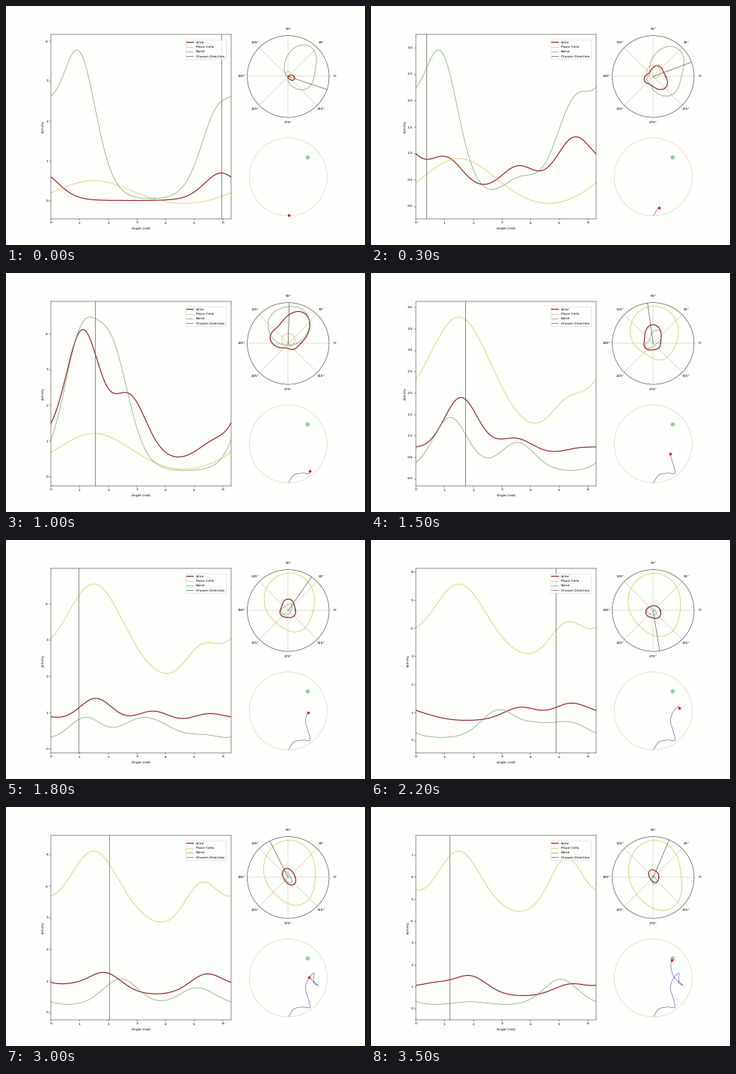
Write a matplotlib script that moves like this. It is 480 by 320 pixels and loops after 3.6 s.

```python
import numpy as np
import matplotlib.pyplot as plt
from matplotlib.animation import FuncAnimation
from matplotlib.patches import Circle

FRAMES, INTERVAL = 36, 100
TAU = 2 * np.pi
R = 52.1  # arena radius, one unit per pixel
ACTOR, PLACE, NOISE, CHOSEN = "#8b1a1a", "#d8b83c", "#5f9c62", "#4a4a40"

theta = np.linspace(0, TAU, 241)


def bump(centre, sharp=2.8):
    return np.exp(sharp * (np.cos(theta - centre) - 1))


def lobes(base, *peaks):
    """Base level plus equally wide peaks, each (height, centre)."""
    return base + sum(h * bump(c) for h, c in peaks)


def place(low, high, second):
    """Broad lobe ahead; it sharpens as the second lobe grows."""
    shape = bump(1.5, .3 + 1.5 * second) + second * bump(5.25)
    return low + (high - low) * (shape - shape.min()) / np.ptp(shape)


# step: heading, actor, place cells, noise
KEYS = {
    0: (5.96, lobes(.01, (.69, 5.95)), place(-.06, .51, 0),
        lobes(.02, (3.55, .97), (2.06, -.45))),
    6: (5.83, lobes(.5, (1.27, 1.05), (.98, 3.57), (1.55, 5.42)), place(.18, 1.3, 0),
        lobes(.2, (1.98, .65), (.78, 3.65), (1.93, 5.3))),
    10: (1.54, lobes(.4, (3.62, 1.1), (1.75, 2.75), (.5, 5.7)), place(.22, 1.22, 0),
         lobes(.15, (3.45, 1.05), (3, 2.15))),
    15: (1.71, lobes(.54, (1.35, 1.57), (.38, 3.5), (.17, 5.8)), place(1.3, 3.78, .17),
         lobes(.16, (1.27, 1.2), (.68, 3.55))),
    22: (4.87, lobes(.7, (.47, 3.65), (.58, 5.4), (.18, .2)), place(3.1, 5.58, .4),
         lobes(.08, (.97, 2.87), (.38, 4.2), (.52, 5.4))),
    26: (6.24, lobes(.56, (.52, 1.85), (.74, 5.47)), place(1.5, 3.45, .15),
         lobes(.25, (1.48, 2.47), (.16, 5.7))),
    35: (1.17, lobes(.55, (.9, 1.9), (.55, 5.4), (.5, .6)), place(4.45, 7.2, .85),
         lobes(.15, (.17, 1.9), (1.2, 5.05))),
}
STEPS = sorted(KEYS)

# bends of the walk, three steps apart, relative to the arena centre
BENDS = np.array([
    (.7, -51.5), (7.7, -41.5), (20.5, -39), (29.2, -39.5), (26.5, -26.5),
    (23, -13.5), (26.5, -1.8), (34.5, 6.5), (34, -6), (40, -10),
    (28, 1), (23.7, 14.8), (25, 28.5)])
SLOPES = np.gradient(BENDS, axis=0)


def walk(step):
    """Cubic Hermite path through the bends."""
    k, t = divmod(step / 3, 1)
    k = int(k)
    ease = t * t * (3 - 2 * t)
    return ((1 - ease) * BENDS[k] + ease * BENDS[k + 1]
            + t * (1 - t) ** 2 * SLOPES[k] - t * t * (1 - t) * SLOPES[k + 1])


WALK = np.array([walk(i) for i in range(FRAMES)])


def state(i):
    """Heading and the three activity curves at a step."""
    if i in KEYS:
        heading, *curves = KEYS[i]
        return heading, curves
    a = max(s for s in STEPS if s < i)
    b = min(s for s in STEPS if s > i)
    w = (i - a) / (b - a)
    curves = [(1 - w) * p + w * q for p, q in zip(KEYS[a][1:], KEYS[b][1:])]
    dx, dy = WALK[i + 1] - WALK[i]
    return np.arctan2(dy, dx) % TAU, curves


plt.rcParams.update({"font.family": "DejaVu Sans", "font.size": 8,
                     "text.hinting": "none"})
fig = plt.figure(figsize=(12, 8), dpi=40, facecolor="#fefefc")
grid = fig.add_gridspec(2, 3)
ax = fig.add_subplot(grid[:, :2], facecolor="none")
polar = fig.add_subplot(grid[0, 2], projection="polar", facecolor="none")
arena = fig.add_subplot(grid[1, 2])


def add_curves(axes):
    styles = (("Actor", ACTOR, 2), ("Place Cells", PLACE, 1.1), ("Noise", NOISE, 1.1))
    lines = [axes.plot(theta, theta, color=c, lw=w, label=name)[0]
             for name, c, w in styles]
    return lines, axes.axvline(0, color=CHOSEN, lw=1.1, label="Chosen Direction")


flat_lines, flat_mark = add_curves(ax)
polar_lines, polar_mark = add_curves(polar)

ax.set_xlim(0, TAU)
ax.set_xlabel("Angle (rad)")
ax.set_ylabel("Activity")
ax.legend(loc="upper right", borderaxespad=1.5)

polar.set_yticks([])
polar.grid(color="#b8b8a8", lw=.8)

arena.set_aspect("equal")
arena.set_xlim(-1.05 * R, 1.05 * R)
arena.set_ylim(-1.05 * R, 1.05 * R)
arena.axis("off")
arena.add_patch(Circle((0, 0), R, fill=False, ec="#a8a888", lw=1.1,
                       ls=(0, (1.5, 1.5))))
arena.add_patch(Circle((R / 2, R / 2), 2.8, fc="#96d296", ec="none"))
trail, = arena.plot([], [], color="#4646b4", lw=1)
agent, = arena.plot([], [], "o", color="#e01c0c", ms=5.5)


def update(i):
    heading, curves = state(i)
    for flat, pol, y in zip(flat_lines, polar_lines, curves):
        flat.set_ydata(y)
        pol.set_ydata(y)
    flat_mark.set_xdata([heading] * 2)
    polar_mark.set_xdata([heading] * 2)
    low, high = np.min(curves), np.max(curves)
    pad = .1 * (high - low)
    ax.set_ylim(low - pad, high + pad)
    polar.set_ylim(0, high + pad)
    trail.set_data(*WALK[:i + 1].T)
    agent.set_data(*WALK[i:i + 1].T)
    return []


anim = FuncAnimation(fig, update, frames=FRAMES, interval=INTERVAL,
                     init_func=lambda: update(0), repeat=True, repeat_delay=0)
plt.show()
```
